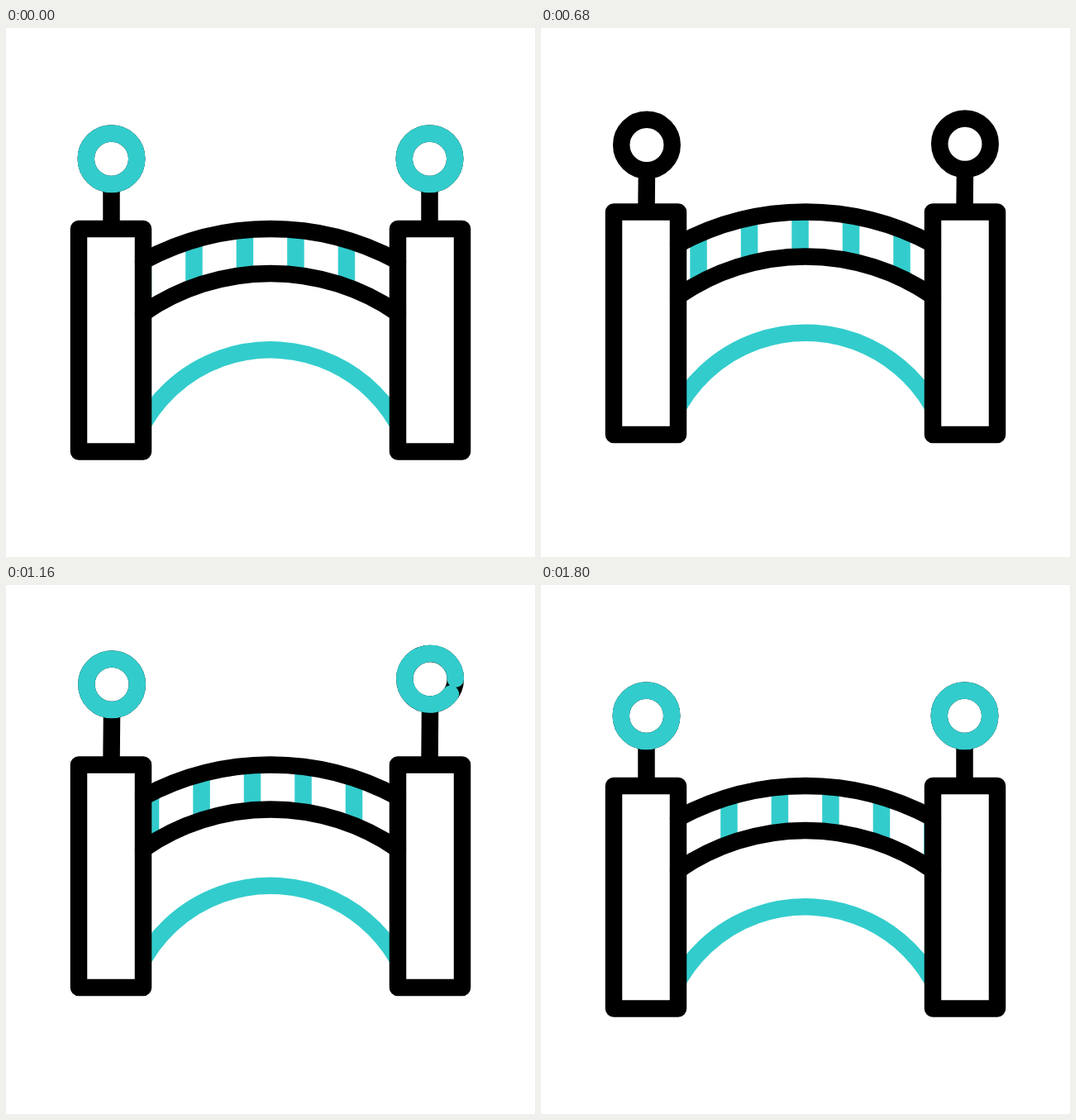
Recreate the animation shown at these times as an HTML page with a canvas. Size 640 px wide and 640 px high, loop 1880 ms.

```html
<!DOCTYPE html>
<html>
<head>
<meta charset="utf-8">
<title>Bridge</title>
<style>
  html, body { margin: 0; width: 100%; height: 100%; overflow: hidden; background: #fff; }
  canvas { display: block; }
</style>
</head>
<body>
<canvas id="stage" width="640" height="640"></canvas>
<script>
const ctx = document.getElementById('stage').getContext('2d');
const LOOP = 1880, STEP = 40, LAST = 1800;
const TEAL = '#33cccc', BLACK = '#000', LINE = 20.5, TURN = 2 * Math.PI;
const BAR_GAP = 61.5, BARS = 6, TRAVEL = 2 * BAR_GAP, LAMP_DELAY = 160;

// Progress from 0 to 1 between two times: linear, or eased at both ends.
const progress = (t, from, to) => Math.min(1, Math.max(0, (t - from) / (to - from)));
function ease(t, from, to, skew = 1) {
  const u = progress(t, from, to) ** skew;
  return u * u * (3 - 2 * u);
}

// The bridge rises, rests and sinks.
const lift = t => 27 * (ease(t, 189, 907) - ease(t, 1087, 1607));
// The bars take a short step, then a long one.
const slide = t => TRAVEL * (0.2 * ease(t, 184, 657) + 0.8 * ease(t, 830, 1680, 0.78));
// A lamp dips, springs up and drops back.
const bob = t => 4 * ease(t, 250, 690) - 23 * ease(t, 755, 980) + 19 * ease(t, 1050, 1330);
// A lamp's ring unwinds from its end, then winds up again from there.
const ringEnd = t => 1 - progress(t, 41, 516) ** 2;
const ringStart = t => (1 - progress(t, 723, 1128)) ** 2;

function stroke(color, cap = 'butt') {
  ctx.strokeStyle = color;
  ctx.lineCap = cap;
  ctx.stroke();
}

// Adds a symmetric arch around x = 320, given its apex, radius and half width.
function arch(top, radius, half, reverse = false) {
  const a = Math.asin(half / radius) * (reverse ? -1 : 1), up = -TURN / 4;
  ctx.arc(320, top + radius, radius, up - a, up + a, reverse);
}

const rail = (top, rise, half = 154) => [top, (half * half + rise * rise) / (2 * rise), half];
const upper = rail(243, 39), lower = rail(297, 48);

function bars(shift) {
  ctx.save();
  ctx.beginPath();
  arch(...upper);
  arch(...lower, true);
  ctx.clip();
  ctx.fillStyle = TEAL;
  for (let i = 0; i < BARS; i++) ctx.fillRect(94.2 + i * BAR_GAP + shift, 230, LINE, 130);
  ctx.restore();
}

function lamp(x, t, rise) {
  const cx = x + rise / 45, cy = 158.2 + bob(t), r = 30.75;
  ctx.beginPath();
  ctx.moveTo(cx, cy + r);
  ctx.lineTo(x, 243);
  stroke(BLACK);
  ctx.beginPath();
  ctx.arc(cx, cy, r, 0, TURN);
  stroke(BLACK);
  const [from, to] = t < 600 ? [0, ringEnd(t)] : [ringStart(t), 1];
  if (from === to) return;
  ctx.beginPath();
  ctx.arc(cx, cy, r, from * TURN, to * TURN);
  stroke(TEAL, 'round');
}

function tower(x) {
  ctx.beginPath();
  ctx.rect(x, 243, 78, 269.5);
  ctx.fillStyle = '#fff';
  ctx.fill();
  stroke(BLACK);
}

function draw(t) {
  const rise = lift(t);
  ctx.fillStyle = '#fff';
  ctx.fillRect(0, 0, 640, 640);
  ctx.save();
  ctx.translate(0, -rise);
  ctx.lineWidth = LINE;
  ctx.lineJoin = 'round';
  bars(slide(t));
  ctx.beginPath();
  arch(389.3, 177, 160);
  stroke(TEAL);
  lamp(127.5, t, rise);
  lamp(512.5, t - LAMP_DELAY, rise);
  tower(88);
  tower(474);
  for (const curve of [upper, lower]) {
    ctx.beginPath();
    arch(...curve);
    stroke(BLACK, 'round');
  }
  ctx.restore();
}

const start = performance.now();
function tick() {
  const t = (performance.now() - start) % LOOP;
  draw(Math.min(Math.floor(t / STEP) * STEP, LAST));
  requestAnimationFrame(tick);
}
tick();
</script>
</body>
</html>
```
